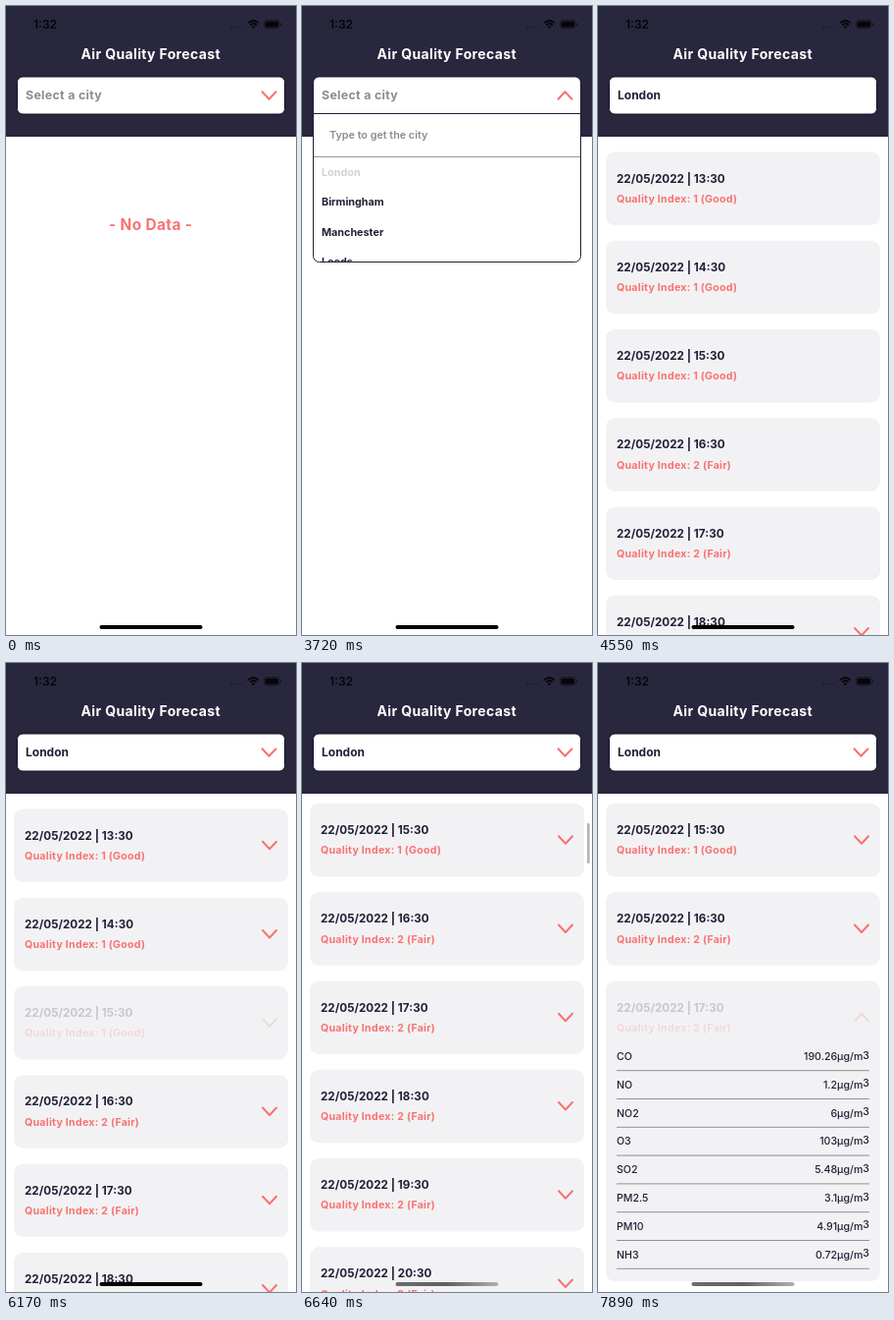
Recreate the animation shown at these times as an HTML page. Size 296x640 px, loop 8 s.

```html
<!DOCTYPE html>
<html lang="en">
<head>
<meta charset="utf-8">
<title>Air Quality Forecast</title>
<style>
  html, body { margin: 0; width: 100%; height: 100%; overflow: hidden; background: #fff; }
  svg { display: block; width: 296px; height: 640px; font-family: Inter, "Open Sans", sans-serif; font-weight: 700; }
  .ink { fill: #211f36; }
  .coral { fill: #f97272; }
  .grey { fill: #8c8c8c; }
  .wide { letter-spacing: .025em; }
  .chevron { fill: none; stroke: #f97272; stroke-width: 2; stroke-linecap: round; stroke-linejoin: round; }
  .row { font-size: 10.6px; font-weight: 500; }
  .list { font-size: 10.8px; }
</style>
</head>
<body>
<svg id="stage" viewBox="0 0 296 640"></svg>
<script>
const LOOP = 8000;
const FIRST_CARD = 148.5, PITCH = 90.25, OPEN_EXTRA = 231;
const OPEN_CARD = 4;

const text = (x, y, size, cls, str, more = '') =>
  `<text x="${x}" y="${y}" font-size="${size}" class="${cls}" ${more}>${str}</text>`;
const chevron = (x, y, id, up = false) => {
  const k = up ? -1 : 1;
  return `<path id="${id}" class="chevron" d="M${x - 7} ${y - 3.7 * k}L${x} ${y + 3.7 * k}L${x + 7} ${y - 3.7 * k}"/>`;
};

const pollutants = [['CO', '190.26'], ['NO', '1.2'], ['NO2', '6'], ['O3', '103'],
  ['SO2', '5.48'], ['PM2.5', '3.1'], ['PM10', '4.91'], ['NH3', '0.72']];
const details = pollutants.map(([name, value], i) => {
  const y = 80.5 + i * 28.8;
  return `<text class="row ink" x="19" y="${y}">${name}</text>
    <text class="row ink" x="277" y="${y}" text-anchor="end">${value}µg/m<tspan dy="-1.5">3</tspan></text>
    <path d="M19 ${y + 10.7}H277" stroke="#85858c" stroke-width=".9"/>`;
}).join('');

const card = i => `<g id="card${i}">
  <rect id="panel${i}" x="8" width="280" height="74.5" rx="9" fill="#f2f2f4"/>
  <g id="label${i}">
    ${text(19, 31.2, 11.7, 'ink', `22/05/2022 | ${13 + i}:30`)}
    ${text(19, 51.4, 10.6, 'coral wide', `Quality Index: ${i < 3 ? '1 (Good)' : '2 (Fair)'}`)}
    ${chevron(269, 37, 'down' + i)}
    ${i === OPEN_CARD ? chevron(269, 37, 'up' + i, true) : ''}
  </g>
  ${i === OPEN_CARD ? `<g id="details">${details}</g>` : ''}
</g>`;
const cards = [...Array(9).keys()];

const statusBar = `
  ${text(28, 23, 12, '', '1:32', 'font-weight="600" fill="#05050a"')}
  <g fill="#16152a">${[230, 233.5, 237, 240.5].map(x => `<circle cx="${x}" cy="21.5" r=".8"/>`).join('')}</g>
  <g fill="none" stroke="#05050a" stroke-width="1.7">
    <path d="M247.3 17.4Q252.5 12.6 257.7 17.4M249.2 19.5Q252.5 16.5 255.8 19.5"/>
  </g>
  <path d="M250.6 21L252.5 23L254.4 21Q252.5 19.3 250.6 21Z" fill="#05050a"/>
  <rect x="263.5" y="14.6" width="15.6" height="8" rx="2.4" fill="none" stroke="#141326" stroke-width=".9"/>
  <rect x="264.7" y="15.8" width="13.2" height="5.6" rx="1.3" fill="#05050a"/>
  <rect x="280" y="17.2" width="1.2" height="2.8" rx=".6" fill="#141326"/>`;

const dropdown = `<g id="dropdown">
  <rect x="11.5" y="72" width="273" height="188.5" rx="6" fill="#fff" stroke="#211f36"/>
  <path d="M12 109.5H284" stroke="#211f36"/>
  <path d="M12 153.5H284" stroke="#9a9a9a"/>
  ${text(28, 135.3, 10.8, 'grey', 'Type to get the city', 'style="font-weight:600"')}
  <g clip-path="url(#listClip)">
    ${['London', 'Birmingham', 'Manchester', 'Leeds'].map((city, i) =>
      `<text id="city${i}" class="list ink" x="20" y="${173 + i * 30.3}">${city}</text>`).join('')}
  </g>
</g>`;

document.getElementById('stage').innerHTML = `
  <clipPath id="listClip"><rect x="12" y="154" width="272" height="106"/></clipPath>
  <linearGradient id="dimmed">
    <stop offset="0" stop-color="#6c6c70"/>
    <stop offset=".5" stop-color="#606064"/>
    <stop offset="1" stop-color="#b0b0b4"/>
  </linearGradient>
  <rect width="296" height="640" fill="#fff"/>
  ${text(147.7, 228, 15.4, 'coral wide', '- No Data -', 'id="empty" text-anchor="middle"')}
  <g id="cards">${cards.map(card).join('')}</g>
  <rect width="296" height="133" fill="#28273d"/>
  ${statusBar}
  ${text(147.7, 54.2, 14, 'wide', 'Air Quality Forecast', 'text-anchor="middle" fill="#fff"')}
  <rect x="11.5" y="72" width="273" height="38" rx="5.5" fill="#fff" stroke="#17152a"/>
  ${dropdown}
  ${text(20, 95.3, 12.4, 'grey wide', 'Select a city', 'id="prompt"')}
  ${text(20, 95.2, 12, 'ink', 'London', 'id="chosen"')}
  ${chevron(268.5, 91, 'headDown')}
  ${chevron(268.5, 91, 'headUp', true)}
  <rect id="scrollbar" x="291" width="2.6" height="41" rx="1.3" fill="#b4b4b6"/>
  <rect id="home" x="95.5" y="630" width="105" height="4" rx="2"/>`;

const el = id => document.getElementById(id);
const show = (id, on) => { el(id).style.display = on ? '' : 'none'; };
const fade = (id, pressed) => { el(id).style.opacity = pressed ? 0.2 : 1; };
const within = (t, from, to = LOOP) => t >= from && t < to;
const stepAt = (t, steps) => steps.reduce((value, [time, next]) => t >= time ? next : value, 0);

const scrollSteps = [[6310, 45], [6420, 120], [6530, 172], [6640, 186]];
const homeSteps = [[0, '#000'], [6530, '#3c3c40'], [6640, 'url(#dimmed)']];

function render(t) {
  const listOpen = within(t, 500, 3870);
  const loaded = t >= 4550;
  const iconsReady = t >= 4660;
  const expanded = t >= 7890;
  const scroll = stepAt(t, scrollSteps);

  show('dropdown', listOpen);
  fade('city0', t >= 3720);
  show('prompt', t < 3870);
  show('chosen', t >= 3870);
  show('headUp', listOpen);
  show('headDown', !listOpen && !within(t, 4550, 4660));
  show('empty', !loaded);

  show('cards', loaded);
  for (const i of cards) {
    const y = FIRST_CARD + i * PITCH - scroll + (expanded && i > OPEN_CARD ? OPEN_EXTRA : 0);
    el('card' + i).setAttribute('transform', `translate(0 ${y})`);
    show('down' + i, (iconsReady || i > 4) && !(expanded && i === OPEN_CARD));
  }
  fade('label2', within(t, 6170, 6310));
  fade('label' + OPEN_CARD, t >= 7760);
  el('panel' + OPEN_CARD).setAttribute('height', 74.5 + (expanded ? OPEN_EXTRA : 0));
  show('up' + OPEN_CARD, expanded);
  show('details', expanded);

  show('scrollbar', within(t, 6310, 7760));
  el('scrollbar').setAttribute('y', 148 + scroll * 0.081);
  el('home').setAttribute('fill', stepAt(t, homeSteps));
}

const start = performance.now();
function tick() {
  render((performance.now() - start) % LOOP);
  requestAnimationFrame(tick);
}
tick();
</script>
</body>
</html>
```
